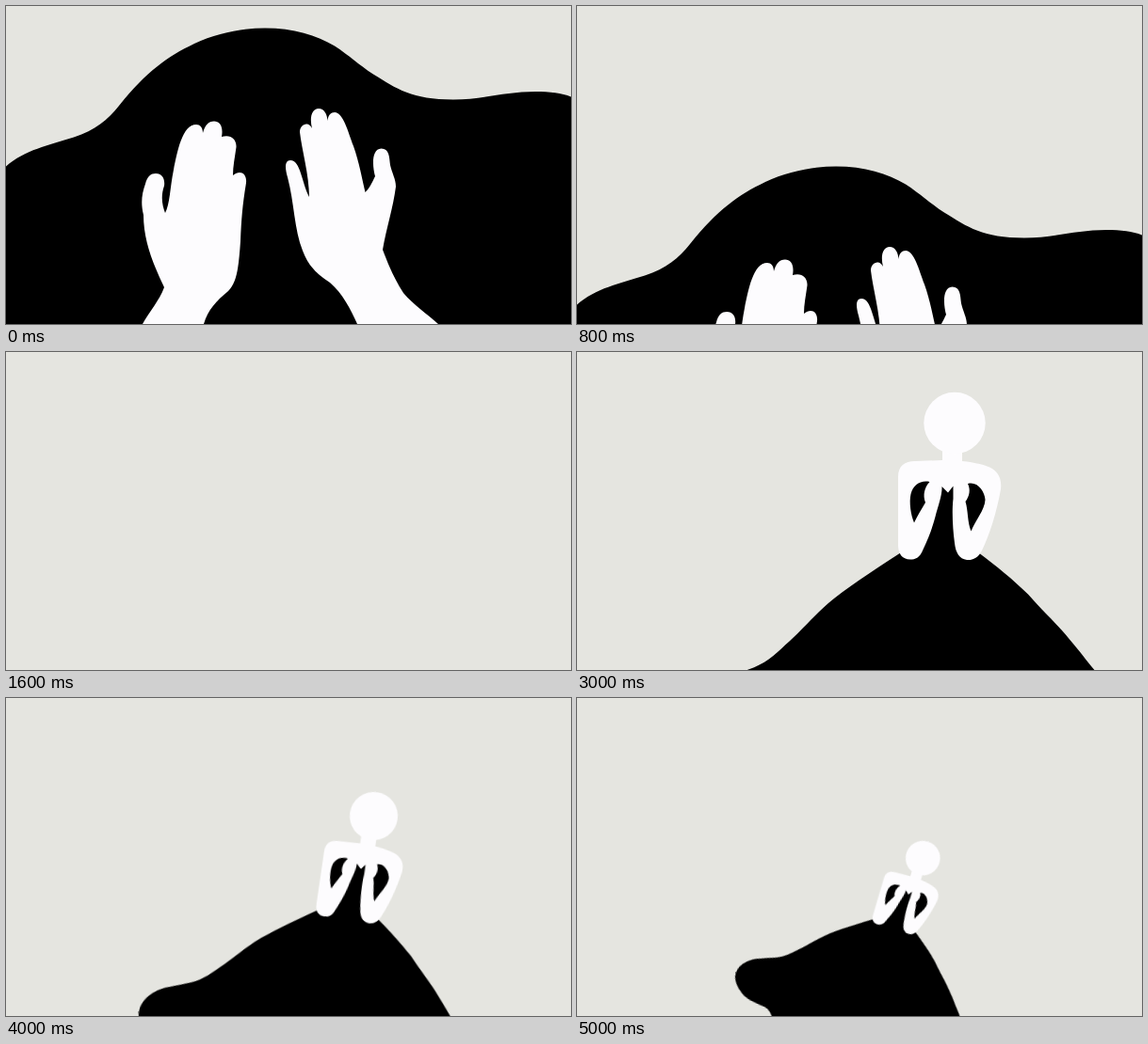
These frames come from a looping animation (600x338 px, 5100 ms). An HTML page:

```html
<!DOCTYPE html>
<html lang="en">
<head>
<meta charset="utf-8">
<title>Hands and dress</title>
<style>
  html, body { margin: 0; width: 100%; height: 100%; overflow: hidden; background: #e5e5e0; }
  svg { display: block; width: 100vw; height: 100vh; }
  .ink { fill: #000; }
  .skin { fill: #fdfcfe; }

  /* Motion advances ten times a second, so every segment is stepped. */
  .hill { animation: sink 5100ms infinite; }
  .figure { animation: recede 5100ms infinite; }

  @keyframes sink {
    0% { transform: translateY(0); }
    1.9607% { transform: translateY(0); animation-timing-function: steps(4); }
    9.8039% { transform: translateY(83px); animation-timing-function: steps(3); }
    15.6862% { transform: translateY(147px); animation-timing-function: steps(8); }
    31.3725%, 100% { transform: translateY(322px); }
  }

  @keyframes recede {
    0% {
      opacity: 0;
      transform: translate(300px, 262px) rotate(0deg) scale(1);
      animation-timing-function: step-end;
    }
    58.8235% {
      opacity: 1;
      transform: translate(300px, 262px) rotate(0deg) scale(1);
      animation-timing-function: steps(20);
    }
    98.0392%, 100% {
      opacity: 1;
      transform: translate(283.4px, 254.3px) rotate(16.5deg) scale(.56);
    }
  }
</style>
</head>
<body>
<svg viewBox="0 0 600 338" preserveAspectRatio="none">
  <g class="hill">
    <path class="ink" d="M0,170.5 C20,153 45,148 72,139.5 C95,132 108,121 120,106
      C150,69 171,54 200,40 C224,29 250,23.5 275,23.5 C305,23.5 330,31 349,42.5
      C365,53 374,62 390,72.5 C415,88 431,99.5 475,99.5 C505,99.5 530,91 562,91
      C578,91 590,92.5 600,96.5 V340 H0 Z"/>
    <!-- left hand -->
    <path class="skin" d="M145,338 C152,325 163,313 168,299 C157,276 146,250 146,222
      C143,210 144,200 148,189 C150,181 154,178 159,178 C166,178 169,184 168,191
      C164,203 166,212 169,220 C174,211 174,194 178,174 C182,155 187,126 202,126
      C206,126 209,129 209,135 C211,127 215,122.5 221,122.5 C227,122.5 231,128 229,139
      C238,136 245,141 244.5,150 C243,161 241,170 241,180 C248,174 256,177 255,188
      C251,213 250,226 249,250 C247,279 245,294 236,303 C223,314 215,322 210,338 Z"/>
    <!-- right hand -->
    <path class="skin" d="M373,338 C366,322 357,305 344,294 C330,285 321,276 315,260
      C306,238 306,208 299,182 C296,172 296,164 302,164 C313,164 314,188 322,203
      C322,180 314,152 312,134 C312,128 316,125.5 320,125.5 Q323,126 325,130
      C322,118 325,109 332,109 C338,109 341,115 341.5,122 C342,116 345,113 349,113
      C358,113 363,133 369,149 C375,166 378,183 381.5,198 C386,194 389,187 392,181
      C389,170 388,152 398.5,151.5 C407,151.5 407,160 408,169 C410,178 414,184 414,192
      C411,215 404,236 400,259 C405,272 411,288 422,305 C433,318 447,327 459,338 Z"/>
  </g>

  <g class="figure">
    <g transform="translate(-300 -262)">
      <!-- dress -->
      <path class="ink" d="M380,140 L410,140 L426,213 C446,228 462,241 479,257.5
        C495,276 511,290 523.5,306 C534,318 541,328 549.5,338 C560,353 569,366 579,380
        L600,600 H300 L240,480 L211,444 C202,433 197,432 189,431
        C175,429 160,428 148,421 C130,409 121,395 123,383 C125,365 142,351 159,346
        C169,342 175,340 182,337.5 C199,332 210,322 221,311.5 C242,293 251,280 273,262
        C296,244 323,227 345,212.5 Z"/>
      <!-- shoulders and arms -->
      <path class="skin" d="M388,100 H409 V116 C423,117.5 434,120 441,124
        C449,129.5 451,137 450,146 C446,169 438,195 430,211 C426,219 420,221.5 414,221
        C406,220 402,213 401,203 C399,188 398,169 399.5,156 L399.5,142.5 L394,149.5 L387.5,143
        C388,152 383.5,163 380.5,175 C376.5,190 372.5,199 367.5,210 C364,219 359,220.5 354,220.5
        C345,220.5 341,214 341,205 V133 C341,121 348,116 359,116 L388,115 Z"/>
      <!-- gaps inside the arms -->
      <path class="ink" d="M358,181.5 C354.5,173 352.5,160 354.5,151 C357,141 365,136 374.5,138
        C369,144 367,152 370,160 C366,167 361.5,174 358,181.5 Z"/>
      <path class="ink" d="M418.5,190.5 C414.5,181 415.5,169 412.5,159 C417,153 418,146 415,140
        C425,137 433,148 433.5,157 C433,168 423,179 418.5,190.5 Z"/>
      <circle class="skin" cx="401" cy="75.5" r="32.7"/>
    </g>
  </g>
</svg>
</body>
</html>
```
